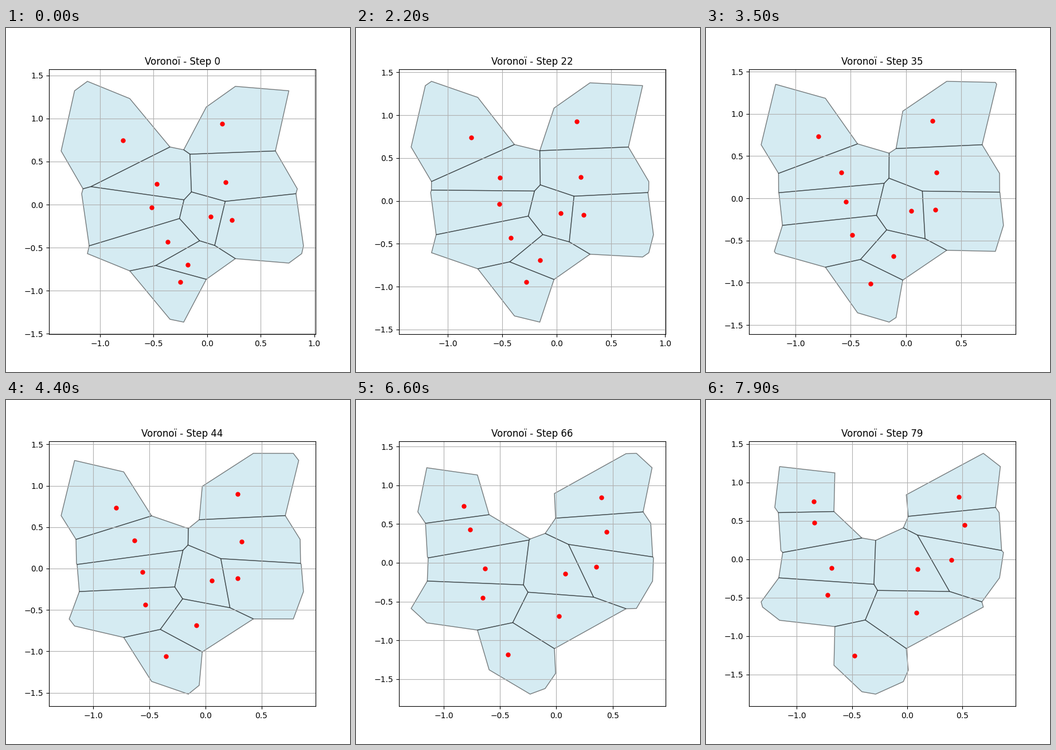
These frames come from a looping animation (600 by 600 pixels, 8000 ms). A matplotlib script:

```python
import itertools

import numpy as np
import matplotlib.pyplot as plt
from matplotlib.animation import FuncAnimation

FRAMES = 80
PERIOD = 2.0
STIFFNESS = 0.001   # acceleration per step from unequal areas
HEAD_START = 2      # steps of acceleration already gained at step 0

START = np.array([
    (-.786, .746), (.139, .939), (-.471, .241), (.171, .261), (-.519, -.032),
    (.032, -.139), (.230, -.177), (-.369, -.431), (-.1825, -.697),
    (-.250, -.896)])

SHIFTS = np.array(list(itertools.product((-PERIOD, 0, PERIOD), repeat=2)))
BOX = PERIOD * np.array([(-1, -1), (1, -1), (1, 1), (-1, 1)])


def clip(poly, normal, limit):
    """Keep the part of a convex polygon where p . normal <= limit."""
    dist = poly @ normal - limit
    if dist.max() <= 0:
        return poly
    kept = []
    for i in range(len(poly)):
        p, q, dp, dq = poly[i - 1], poly[i], dist[i - 1], dist[i]
        if (dp <= 0) != (dq <= 0):
            kept.append(p + (q - p) * dp / (dp - dq))
        if dq <= 0:
            kept.append(q)
    return np.array(kept)


def cell(site, copies):
    """Voronoi cell of one site among all periodic copies."""
    offsets = copies - site
    norms = (offsets ** 2).sum(axis=1)
    poly = BOX
    for k in np.argsort(norms):
        if norms[k] > 1e-12:
            poly = clip(poly, offsets[k], norms[k] / 2)
    return poly + site


def area(poly):
    x, y = poly.T
    return (x @ np.roll(y, -1) - y @ np.roll(x, -1)) / 2


def diagram(sites):
    """Cells, and the force on each site that evens out the cell areas."""
    copies = (sites[:, None] + SHIFTS).reshape(-1, 2)
    cells = [cell(s, copies) for s in sites]
    areas = np.array([area(c) for c in cells])
    forces = []
    for site, a, own in zip(sites, cells, areas):
        b = np.roll(a, -1, axis=0)
        edge = b - a
        length = np.maximum(np.hypot(*edge.T), 1e-12)
        normal = np.stack([edge[:, 1], -edge[:, 0]], axis=1) / length[:, None]
        gap = 2 * ((a - site) * normal).sum(axis=1)
        # The neighbour across an edge is the mirror image of the site
        mirror = site + gap[:, None] * normal
        dist = ((mirror[:, None] - copies) ** 2).sum(axis=2)
        neighbour = dist.argmin(axis=1) // len(SHIFTS)
        weight = (areas[neighbour] - own) * length / gap
        forces.append(weight @ ((a + b) / 2 - site))
    return cells, np.array(forces)


def simulate():
    """Undamped motion of the sites, as (sites, cells) for each step."""
    sites = START
    cells, force = diagram(sites)
    velocity = HEAD_START * STIFFNESS * force
    states = [(sites, cells)]
    while len(states) < FRAMES:
        velocity = velocity + STIFFNESS * force
        sites = sites + velocity
        cells, force = diagram(sites)
        states.append((sites, cells))
    return states


STATES = simulate()
fig, ax = plt.subplots(figsize=(6, 6), dpi=100)


def draw(step):
    sites, cells = STATES[step]
    ax.clear()
    for poly in cells:
        ax.fill(*poly.T, facecolor="lightblue", edgecolor="black", alpha=0.5)
    ax.plot(*sites.T, "ro", markersize=5)
    ax.set_title(f"Voronoï - Step {step}")
    ax.grid(True)
    return []


anim = FuncAnimation(fig, draw, frames=FRAMES, interval=100,
                     init_func=lambda: [], repeat=True, repeat_delay=0)
plt.show()
```
